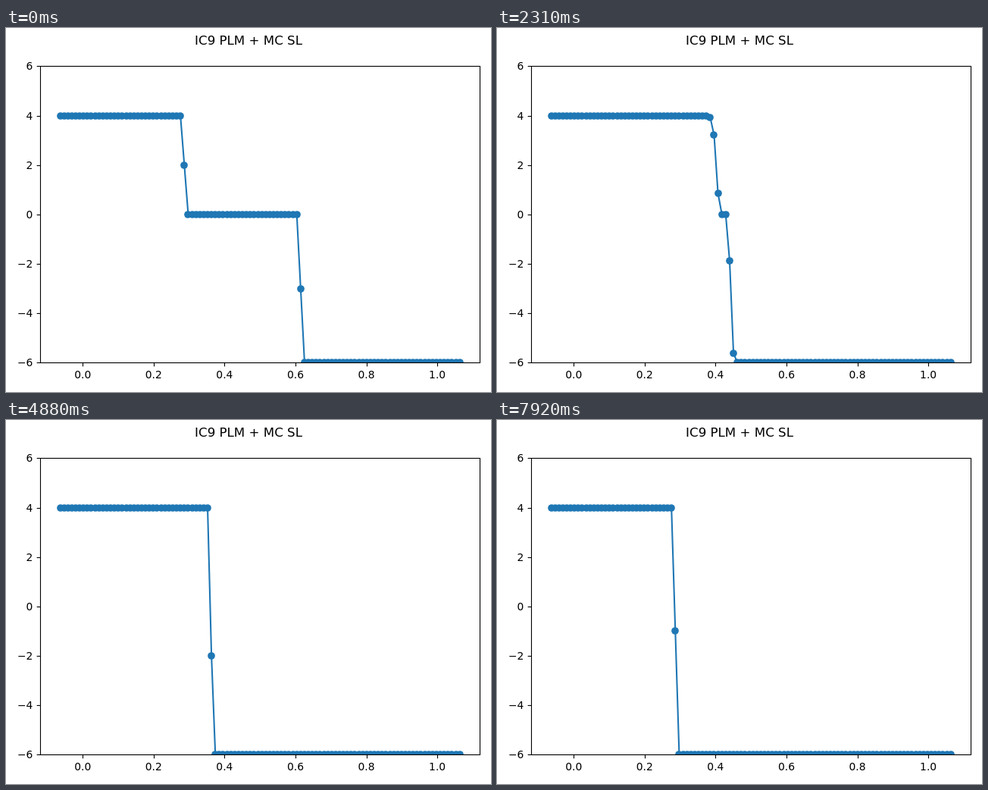
Animation, 640 px wide and 480 px high, one loop 7.99 s. Source, as an HTML page with a canvas:

```html
<!DOCTYPE html>
<html lang="en">
<head>
<meta charset="utf-8">
<title>Colliding shocks</title>
<style>
  html, body { margin: 0; width: 100%; height: 100%; overflow: hidden; background: #fff; }
  canvas { display: block; }
</style>
</head>
<body>
<canvas id="plot" width="640" height="480"></canvas>
<script>
const ctx = document.getElementById('plot').getContext('2d');
const LOOP = 7990, STEP_MS = 66, STEPS = 120;
const CELLS = 104, DT_DX = 0.15;
const BOX = { left: 45, top: 50, right: 625, bottom: 441 };

const cellX = i => 71.55 + 5.1175 * i;
const tickX = x => 101.2 + 467.9 * x;
const valueY = v => 245.85 - 32.575 * v;

// Two shocks, 4 -> 0 and 0 -> -6, each with a half-way cell.
const initial = Array.from({ length: CELLS }, (_, i) =>
  i < 32 ? 4 : i === 32 ? 2 : i < 62 ? 0 : i === 62 ? -3 : -6);

// Godunov flux of Burgers' equation for a non-increasing profile.
const flux = (l, r) => Math.max(Math.max(l, 0) ** 2, Math.min(r, 0) ** 2) / 2;

function advance(u) {
  return u.map((v, i) => {
    const left = u[Math.max(i - 1, 0)], right = u[Math.min(i + 1, CELLS - 1)];
    return v + DT_DX * (flux(left, v) - flux(v, right));
  });
}

const states = [initial];
while (states.length <= STEPS) states.push(advance(states[states.length - 1]));

// Step times are rounded to 10 ms.
const startOf = k => 10 * Math.round(k * STEP_MS / 10);

function stepAt(time) {
  let k = STEPS;
  while (startOf(k) > time) k--;
  return k;
}

function drawLine(x1, y1, x2, y2) {
  ctx.beginPath();
  ctx.moveTo(x1, y1);
  ctx.lineTo(x2, y2);
  ctx.stroke();
}

function drawCurve(u) {
  ctx.save();
  ctx.beginPath();
  ctx.rect(BOX.left, BOX.top, BOX.right - BOX.left, BOX.bottom - BOX.top);
  ctx.clip();
  ctx.strokeStyle = ctx.fillStyle = '#1f77b4';
  ctx.lineWidth = 2.083;
  ctx.lineJoin = 'round';
  ctx.beginPath();
  u.forEach((v, i) => ctx.lineTo(cellX(i), valueY(v)));
  ctx.stroke();
  u.forEach((v, i) => {
    ctx.beginPath();
    ctx.arc(Math.round(cellX(i)), Math.round(valueY(v)), 4.86, 0, 2 * Math.PI);
    ctx.fill();
  });
  ctx.restore();
}

function drawAxes() {
  ctx.strokeStyle = ctx.fillStyle = '#000';
  ctx.lineWidth = 1.11;
  ctx.strokeRect(BOX.left + 0.5, BOX.top + 0.5, BOX.right - BOX.left, BOX.bottom - BOX.top);

  ctx.font = '13.89px "DejaVu Sans", sans-serif';
  ctx.textAlign = 'center';
  for (let n = 0; n <= 5; n++) {
    const x = tickX(n / 5), px = Math.round(x) + 0.5;
    drawLine(px, BOX.bottom + 0.5, px, BOX.bottom + 5.36);
    ctx.fillText((n / 5).toFixed(1), x, 462);
  }
  ctx.textAlign = 'right';
  for (let v = -6; v <= 6; v += 2) {
    const y = Math.round(valueY(v));
    drawLine(BOX.left + 0.5, y + 0.5, BOX.left - 4.36, y + 0.5);
    ctx.fillText(String(v).replace('-', '\u2212'), 35.4, y + 5);
  }

  ctx.font = '16.67px "DejaVu Sans", sans-serif';
  ctx.textAlign = 'center';
  ctx.fillText('IC9 PLM + MC SL', 320, 22);
}

function render(now) {
  ctx.fillStyle = '#fff';
  ctx.fillRect(0, 0, 640, 480);
  drawCurve(states[stepAt(Math.max(now, 0) % LOOP)]);
  drawAxes();
  requestAnimationFrame(render);
}
requestAnimationFrame(render);
</script>
</body>
</html>
```
